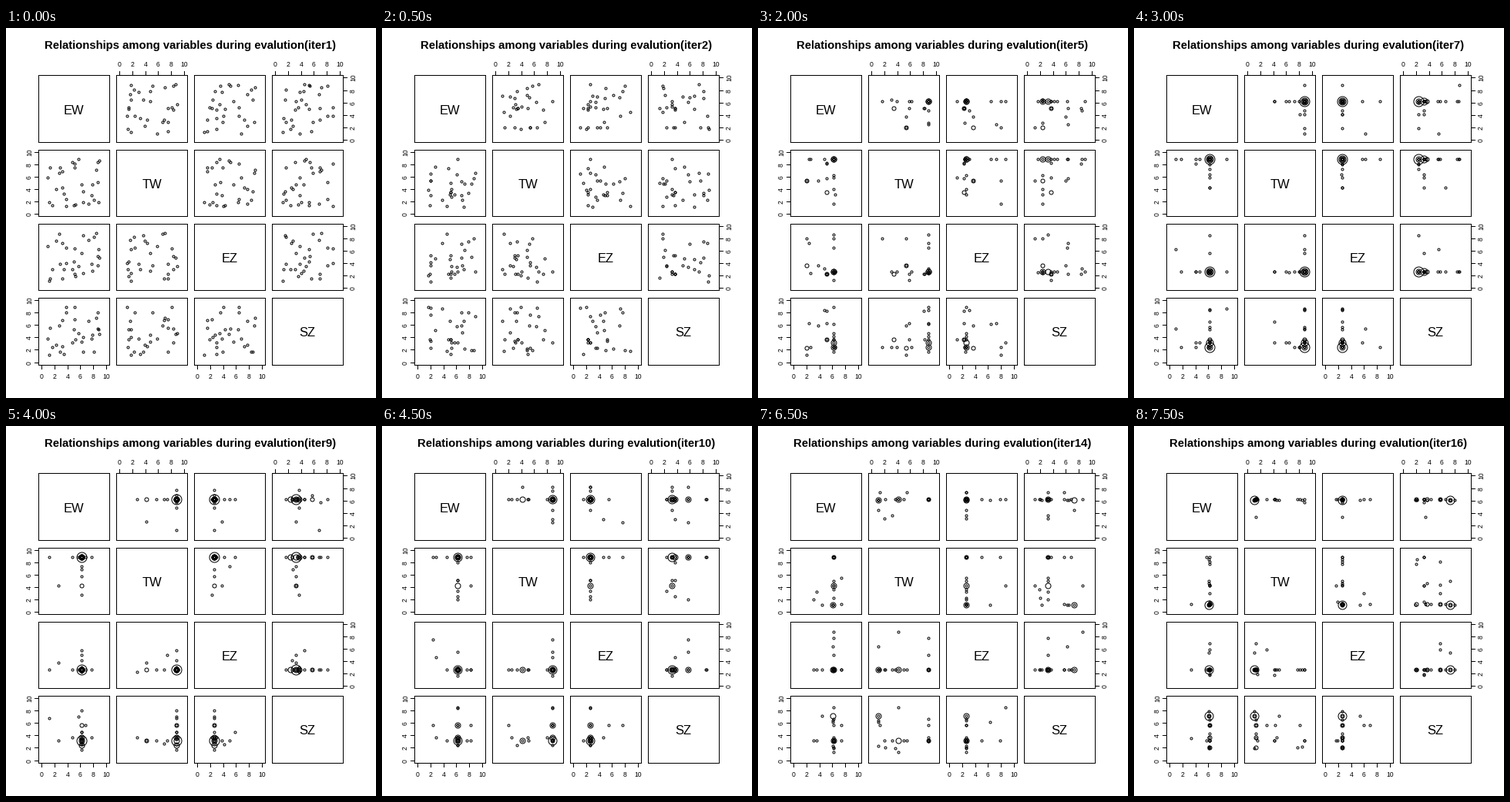
Recreate the animation shown at these times as a matplotlib script. Size 480 px wide and 480 px high, loop 8 s.

```python
import numpy as np
import matplotlib.pyplot as plt
from matplotlib.animation import FuncAnimation
from matplotlib.patches import Rectangle

SIZE, DPI = 480, 80
PX = 72 / DPI
GENS, STEP_MS = 16, 500
LABELS = ["EW", "TW", "EZ", "SZ"]
SMALL = 2

# Panel grid in pixels
LINE = 9.504
LEFT, TOP, GAP = 4 * LINE, 6 * LINE, LINE / 2
CELL_W = (SIZE - 8 * LINE) / 4
CELL_H = (SIZE - 10 * LINE) / 4
UNIT_X = (CELL_W - 2 * GAP) / 10.8
UNIT_Y = (CELL_H - 2 * GAP) / 10.8

# Dominant individuals: genes, generation of the peak, peak radius, reach
CHAMPIONS = [
    ((6.2, 8.8, 2.6, 3.2), 9, 7, 9),
    ((6.2, 8.8, 2.6, 2.4), 7, 7, 4.5),
    ((6.2, 8.8, 2.6, 3.65), 9.5, 4, 7),
    ((6.2, 8.8, 2.6, 5.7), 10.5, 4, 5),
    ((5.1, 3.5, 2.25, 3.65), 4, 4, 4),
    ((2.0, 5.4, 3.65, 2.35), 4, 4, 4),
    ((6.2, 4.2, 2.6, 3.2), 12, 5, 7),
    ((6.1, 1.1, 2.6, 7.2), 16, 6, 5),
] + [((6.2, 1.3, 2.6, s), 16, 3, 2.5) for s in (2.0, 3.65, 5.7)]


def to_x(col, v):
    return LEFT + col * CELL_W + GAP + (v + 0.4) * UNIT_X


def to_y(row, v):
    return TOP + (row + 1) * CELL_H - GAP - (v + 0.4) * UNIT_Y


def population(gen):
    """Rows of four genes and a radius: champions plus their mutants."""
    rng = np.random.default_rng(100 + gen)
    genes = np.array([c[0] for c in CHAMPIONS])
    power = np.array([max(0, peak * (1 - abs(gen - mid) / reach))
                      for _, mid, peak, reach in CHAMPIONS])

    # Diversity fades from fully random to about one mutated gene each
    wild = np.exp(-(gen - 1) / 2.2)
    n = round(17 + 13 * wild)
    weights = power + 0.01
    parents = rng.choice(len(genes), n, p=weights / weights.sum())
    mutated = rng.random((n, 4)) < 0.1 + 0.9 * wild
    mutated[np.arange(n), rng.integers(4, size=n)] = True
    strays = np.where(mutated, rng.uniform(1, 9, (n, 4)), genes[parents])

    rows = [[*s, SMALL] for s in strays]
    for g, p in zip(genes, power):
        if p > 1:
            r = max(SMALL, round(p))
            rows.append([*g, r])
            if r >= 5:
                rows.append([*g, r - 3])
    return np.array(rows)


pops = [population(g) for g in range(1, GENS + 1)]
radii = sorted({r for p in pops for r in p[:, 4]})

plt.rcParams["font.family"] = "Liberation Sans"
plt.rcParams["path.snap"] = False
fig = plt.figure(figsize=(SIZE / DPI, SIZE / DPI), dpi=DPI, facecolor="white")
ax = fig.add_axes([0, 0, 1, 1])
ax.set_xlim(0, SIZE)
ax.set_ylim(SIZE, 0)
ax.axis("off")


def mid(v):
    """Centre of the pixel that holds v."""
    return int(v) + 0.5


def stroke(x0, y0, x1, y1):
    ax.plot([x0, x1], [y0, y1], color="black", lw=PX, antialiased=False)


def write(x, y, s, px, **kw):
    return ax.text(x, y, s, fontsize=px * PX, ha="center", color="black", **kw)


def span(start, cell, k):
    return mid(start + k * cell + GAP), mid(start + (k + 1) * cell - GAP)


for row in range(4):
    y0, y1 = span(TOP, CELL_H, row)
    for col in range(4):
        x0, x1 = span(LEFT, CELL_W, col)
        ax.add_patch(Rectangle((x0, y0), x1 - x0, y1 - y0, fill=False,
                               ec="black", lw=PX, antialiased=False))
    write(LEFT + (row + 0.5) * CELL_W - 0.3, TOP + (row + 0.5) * CELL_H + 6.5,
          LABELS[row], 16.5, va="baseline")

xmin, xmax = span(LEFT, CELL_W, 0)[0], span(LEFT, CELL_W, 3)[1]
ymin, ymax = span(TOP, CELL_H, 0)[0], span(TOP, CELL_H, 3)[1]
for k in range(4):
    for v in range(0, 11, 2):
        x, y = mid(to_x(k, v)), mid(to_y(k, v))
        if k % 2:
            stroke(x, ymin, x, ymin - 5)
            write(x - 0.5, 50, v, 8.6, va="baseline")
            stroke(xmin, y, xmin - 5, y)
            write(30.5, y, v, 8.6, va="center", rotation=90)
        else:
            stroke(x, ymax, x, ymax + 5)
            write(x - 0.5, 455, v, 8.6, va="baseline")
            stroke(xmax, y, xmax + 5, y)
            write(450.5, y, v, 8.6, va="center", rotation=90)

title = write(239, 27.5, "", 14.85, weight="bold", va="baseline")
rings = {r: ax.plot([], [], "o", ms=(2 * r - 1) * PX, mfc="none", mec="black",
                    mew=PX, antialiased=False)[0] for r in radii}
PAIRS = [(row, col) for row in range(4) for col in range(4) if row != col]


def draw(i):
    pop = pops[i]
    title.set_text(f"Relationships among variables during evalution(iter{i + 1})")
    for r, ring in rings.items():
        pts = pop[pop[:, 4] == r]
        xs = np.concatenate([to_x(col, pts[:, col]) for _, col in PAIRS])
        ys = np.concatenate([to_y(row, pts[:, row]) for row, _ in PAIRS])
        ring.set_data(np.floor(xs), np.floor(ys))
    return [title, *rings.values()]


anim = FuncAnimation(fig, draw, frames=GENS, interval=STEP_MS,
                     repeat=True, repeat_delay=0)
plt.show()
```
